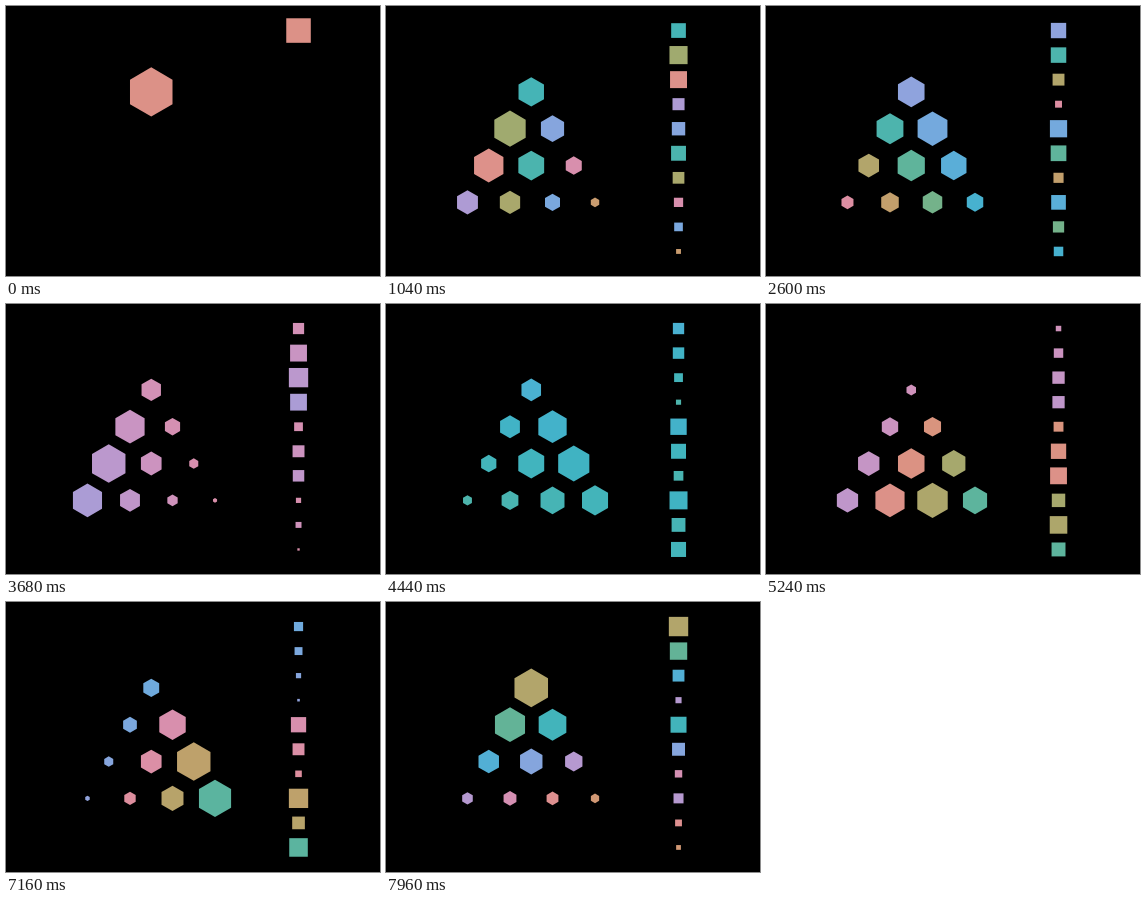
Recreate the animation shown at these times as an HTML page with a canvas. Size 374x270 px, loop 8 s.

```html
<!DOCTYPE html>
<html lang="en">
<head>
<meta charset="utf-8">
<title>Three-level state, cubed</title>
<style>
  html, body { margin: 0; width: 100%; height: 100%; overflow: hidden; background: #000; }
  canvas { display: block; width: 374px; height: 270px; }
</style>
</head>
<body>
<canvas id="stage" width="374" height="270"></canvas>
<script>
const W = 374, H = 270, LOOP = 8000, STEP = 40, PERIOD = 10240;
const R = H / 11;                       // hexagon radius and square side at full amplitude
const HEX_W = R * Math.sqrt(3);
const MARGIN = (W - 6 * R - 1.5 * HEX_W) / 2;
const ctx = document.getElementById('stage').getContext('2d');

// A rotating three-component state: each component is a sum of three harmonics.
const HARMONICS = [-2, -1, 3];
const COMPONENTS = [
  [[0.677, 0], [0.193, 0], [0.13, 0]],
  [[0.2657, -0.1032], [-0.2624, -0.1342], [-0.0033, 0.2374]],
  [[0.239, 0.2846], [-0.2577, -0.0419], [0.0187, -0.2427]],
];

function polar(weights, angle) {
  let re = 0, im = 0;
  weights.forEach(([x, y], k) => {
    const c = Math.cos(HARMONICS[k] * angle), s = Math.sin(HARMONICS[k] * angle);
    re += x * c - y * s;
    im += x * s + y * c;
  });
  return { size: Math.hypot(re, im), phase: Math.atan2(im, re) };
}

// Constant lightness and chroma in CIELAB (D65), hue from the phase.
function phaseColor(phase) {
  const hue = phase + 32 * Math.PI / 180, L = 67.5, C = 32;
  const fy = (L + 16) / 116;
  const x = 0.9505 * (fy + C * Math.cos(hue) / 500) ** 3;
  const y = fy ** 3;
  const z = 1.089 * (fy - C * Math.sin(hue) / 200) ** 3;
  const rgb = [
    3.2406 * x - 1.5372 * y - 0.4986 * z,
    -0.9689 * x + 1.8758 * y + 0.0415 * z,
    0.0557 * x - 0.204 * y + 1.057 * z,
  ].map(v => Math.round(255 * (1.055 * Math.max(v, 0.0031) ** (1 / 2.4) - 0.055)));
  return `rgb(${rgb})`;
}

function hexagon(cx, cy, r) {
  ctx.beginPath();
  for (let k = 0; k < 6; k++) {
    const t = k * Math.PI / 3;
    ctx.lineTo(cx + r * Math.sin(t), cy - r * Math.cos(t));
  }
  ctx.fill();
}

const factorial = n => n < 2 ? 1 : n * factorial(n - 1);

function draw(ms) {
  ctx.fillStyle = '#000';
  ctx.fillRect(0, 0, W, H);
  const [a, b, c] = COMPONENTS.map(w => polar(w, 2 * Math.PI * ms / PERIOD));
  let slot = 0;
  for (let k = 0; k <= 3; k++) {
    for (let j = 0; j <= 3 - k; j++) {
      const i = 3 - j - k;
      const count = 6 / (factorial(i) * factorial(j) * factorial(k));
      const amplitude = Math.sqrt(count) * a.size ** i * b.size ** j * c.size ** k;
      const size = R * Math.sqrt(amplitude);
      ctx.fillStyle = phaseColor(i * a.phase + j * b.phase + k * c.phase);
      hexagon(MARGIN + HEX_W * (1.5 + (k - j) / 2), R * (3.5 + 1.5 * (j + k)), size);
      slot++;
      ctx.fillRect(W - MARGIN - size / 2, slot * R - size / 2, size, size);
    }
  }
}

function tick() {
  const ms = performance.now() % LOOP;
  draw(Math.floor(ms / STEP) * STEP);
  requestAnimationFrame(tick);
}
tick();
</script>
</body>
</html>
```
